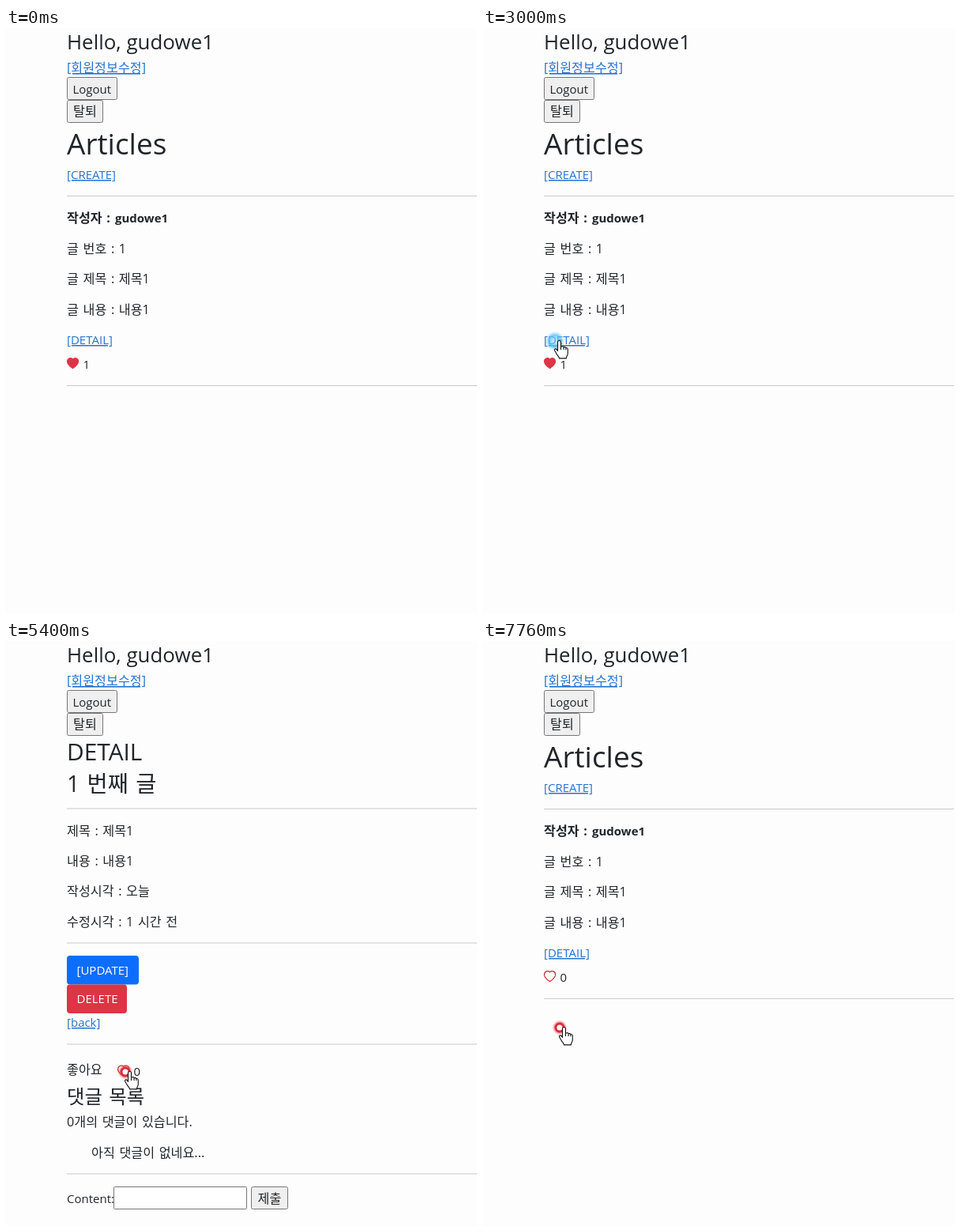
These frames come from a looping animation (596x740 px, 7800 ms). An HTML page:

```html
<!DOCTYPE html>
<html lang="ko">
<head>
<meta charset="utf-8">
<title>Articles</title>
<style>
  html, body { margin: 0; width: 100%; height: 100%; overflow: hidden; background: #fefdfe; }
  svg { display: block; width: 596px; height: 740px; }
  text { font: 15px "Open Sans", "Noto Sans CJK KR", sans-serif; fill: #212529; white-space: pre; }
  .ko { font-size: 16.2px; word-spacing: 1.4px; }
  .link { fill: #2673d0; text-decoration: underline 1px; text-decoration-skip-ink: none; text-underline-offset: 2px; }
  .bold { font-weight: 700; }
  .white { fill: #fff; }
  .rule { stroke: #c9c8cd; }
  .button { fill: #efefef; stroke: #767676; }
  .input { fill: #fff; stroke: #767676; }
  .cursor { fill: #fff; stroke: #111; stroke-width: 1.1; stroke-linejoin: round; }
</style>
</head>
<body>
<svg viewBox="0 0 596 740">
  <defs>
    <path id="heart" d="M8 1.314C12.438-3.248 23.534 4.735 8 15-7.534 4.736 3.562-3.248 8 1.314z"/>
    <g id="liked"><use href="#heart" fill="#dc3545"/></g>
    <g id="unliked"><use href="#heart" fill="none" stroke="#c42b34" stroke-width="1.5" transform="translate(.6 .6) scale(.925)"/></g>
    <radialGradient id="redGlow">
      <stop offset=".6" stop-color="#f0505a" stop-opacity=".75"/>
      <stop offset="1" stop-color="#f0505a" stop-opacity="0"/>
    </radialGradient>
    <radialGradient id="blueGlow">
      <stop offset="0" stop-color="#8fd8fb" stop-opacity=".35"/>
      <stop offset=".6" stop-color="#4fc0f7" stop-opacity=".8"/>
      <stop offset="1" stop-color="#7fd2fa" stop-opacity="0"/>
    </radialGradient>
  </defs>

  <text x="77" y="27" style="font-size:25.9px">Hello, gudowe1</text>
  <text class="ko link" x="77" y="56">[회원정보수정]</text>
  <rect class="button" x="77.5" y="62.5" width="63" height="28" rx="2"/>
  <text x="84.5" y="83">Logout</text>
  <rect class="button" x="77.5" y="91.5" width="45" height="28" rx="2"/>
  <text class="ko" x="85" y="111">탈퇴</text>

  <g id="list">
    <text x="77" y="160" style="font-size:37px">Articles</text>
    <text class="link" x="77" y="191">[CREATE]</text>
    <path class="rule" d="M77 212.5H596M77 452.5H596"/>
    <text class="ko bold" x="77" y="246">작성자 :</text>
    <text class="bold" x="138" y="246">gudowe1</text>
    <text class="ko" x="77" y="284.5">글 번호 : 1</text>
    <text class="ko" x="77" y="323">글 제목 : 제목1</text>
    <text class="ko" x="77" y="361.5">글 내용 : 내용1</text>
    <text class="link" x="77" y="400">[DETAIL]</text>
    <use class="heart" transform="translate(77 417) scale(.95)"/>
    <text class="count" x="97.5" y="430.5"></text>
  </g>

  <g id="detail">
    <text x="77" y="151" style="font-size:29.8px">DETAIL</text>
    <text class="ko" x="77" y="191" style="font-size:28.4px;word-spacing:2px">1 번째 글</text>
    <path class="rule" d="M77 212H596M77 382H596M77 510H596M77 674H596"/>
    <text class="ko" x="77" y="245.5">제목 : 제목1</text>
    <text class="ko" x="77" y="284">내용 : 내용1</text>
    <text class="ko" x="77" y="322">작성시각 : 오늘</text>
    <text class="ko" x="77" y="360.5">수정시각 : 1 시간 전</text>
    <rect id="update" x="77" y="398" width="91" height="36.5" rx="4"/>
    <text class="white" x="89.5" y="421.5">[UPDATE]</text>
    <rect fill="#dc3545" x="77" y="434.5" width="76" height="36.5" rx="4"/>
    <text class="white" x="89.5" y="458">DELETE</text>
    <text class="link" x="77" y="488">[back]</text>
    <text class="ko" x="77" y="548">좋아요</text>
    <rect id="focus" x="127.5" y="524.5" width="57" height="39" rx="5" fill="#fefdfe" stroke="#c2dbfe" stroke-width="3.6"/>
    <use class="heart" transform="translate(141 536.5) scale(.98)"/>
    <text class="count" x="161.5" y="549.5"></text>
    <text class="ko" x="77" y="585" style="font-size:24.4px;word-spacing:2px">댓글 목록</text>
    <text class="ko" x="77" y="614">0개의 댓글이 있습니다.</text>
    <text class="ko" x="108" y="652.5">아직 댓글이 없네요...</text>
    <text x="77" y="710.5">Content:</text>
    <rect class="input" x="136.5" y="690.5" width="168" height="28" rx="1"/>
    <rect class="button" x="310.5" y="690.5" width="46" height="28" rx="2"/>
    <text class="ko" x="318.5" y="710.5">제출</text>
  </g>

  <g id="pointer">
    <g id="halo">
      <circle r="9.5" fill="url(#redGlow)"/>
      <circle r="5" fill="#fff" stroke="#dc2f3a" stroke-width="3"/>
    </g>
    <circle id="press" r="12.5" fill="url(#blueGlow)"/>
    <g id="cursor">
      <path id="arrow" class="cursor" transform="translate(1 1)" d="M0 0V16l3.8-3.6 2.7 6.1 2.6-1.1-2.7-5.9H11.5z"/>
      <path id="hand" class="cursor" transform="translate(5.5 -.5)" d="M-2 2a2 2 0 0 1 4 0v6l1-.6a1.7 1.7 0 0 1 2.6 1 1.8 1.8 0 0 1 2.8.9 1.6 1.6 0 0 1 2.4 1.6v5c0 3-2 4-2 6.5H0c0-2-2-3-3.5-6l-2.3-4c-.9-1.8 1.4-2.8 2.6-1.3L-2 13zM2 8v3.5M5.6 8.4v3M8.4 9.3v2.5"/>
      <circle id="busy" cx="15" cy="2" r="5.2" fill="#fff" stroke="#2b93e8" stroke-width="3.6"/>
    </g>
  </g>
</svg>
<script>
const LOOP = 7800;
const $ = id => document.getElementById(id);

// Pointer stops: time, x, y
const stops = [
  [1680, 36, -22], [2440, 91, 396], [3400, 91, 396], [3960, 167, 552],
  [4140, 167, 552], [4520, 151, 545], [5700, 151, 545], [6200, 134, 538],
  [6400, 134, 538], [6900, 97, 489], [LOOP, 97, 489]
];
const presses = [[2940, 3080], [4620, 4780], [7180, 7340]];
const handTimes = [[2400, 3120], [4140, 4560], [4880, 6460], [6840, LOOP]];
const within = (t, spans) => spans.some(([from, to]) => t >= from && t < to);
const show = (id, on) => $(id).style.display = on ? "" : "none";

function pointerAt(t) {
  if (t <= stops[0][0]) return stops[0].slice(1);
  const i = stops.findIndex(stop => t <= stop[0]);
  const [t0, x0, y0] = stops[i - 1], [t1, x1, y1] = stops[i];
  const u = (t - t0) / (t1 - t0), s = u * u * (3 - 2 * u);
  return [x0 + (x1 - x0) * s, y0 + (y1 - y0) * s];
}

const place = (id, [x, y]) => $(id).setAttribute("transform", `translate(${x} ${y})`);

function draw(t) {
  const onDetail = t >= 3160 && t < 7400;
  const liked = t < 4880;
  const pressed = within(t, presses);
  const hand = within(t, handTimes);

  show("list", !onDetail);
  show("detail", onDetail);
  show("focus", t >= 4640 && t < 4880);
  for (const heart of document.querySelectorAll(".heart")) heart.setAttribute("href", liked ? "#liked" : "#unliked");
  for (const count of document.querySelectorAll(".count")) count.textContent = liked ? "1" : "0";

  // The update button fades out of its hover colour
  const fade = Math.min(1, Math.max(0, (t - 3720) / 150));
  const mix = (from, to) => from + (to - from) * fade;
  $("update").setAttribute("fill", `rgb(${mix(11, 13)} ${mix(94, 110)} ${mix(215, 253)})`);

  show("pointer", t >= 1700);
  show("halo", !pressed);
  show("press", pressed);
  show("hand", hand);
  show("arrow", !hand);
  show("busy", t >= 3120 && t < 3920);
  place("cursor", pointerAt(t));
  place("halo", pointerAt(t - 20));
  place("press", pointerAt(t));
}

const start = performance.now();
function tick() {
  draw((performance.now() - start) % LOOP);
  requestAnimationFrame(tick);
}
tick();
</script>
</body>
</html>
```
